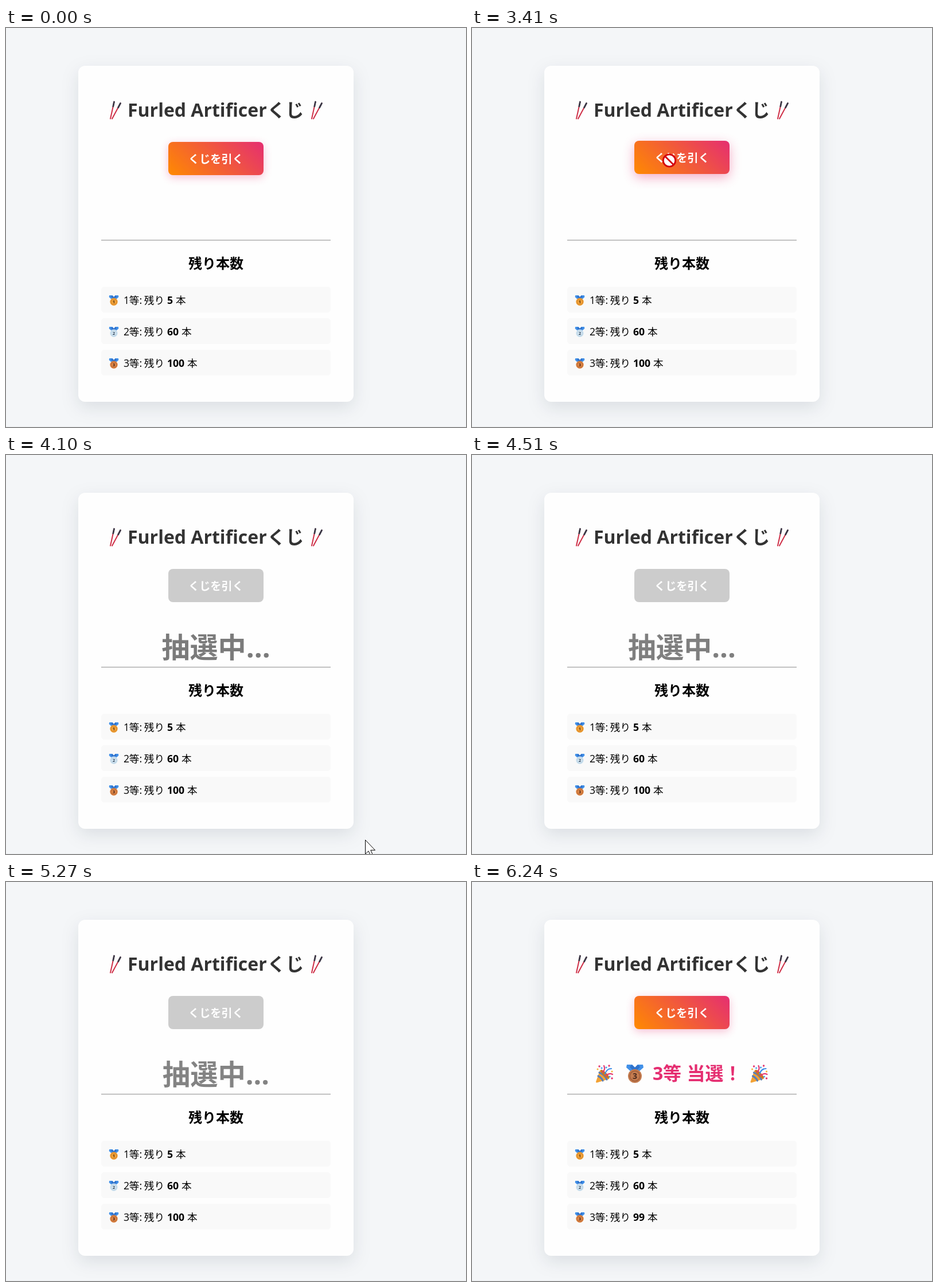
An HTML page that plays this animation: 802 px wide and 697 px high, repeating every 7760 ms.

```html
<!DOCTYPE html>
<html lang="ja">
<head>
<meta charset="utf-8">
<title>くじ</title>
<style>
html, body { margin: 0; width: 100%; height: 100%; overflow: hidden; background: #f4f6f8; }
svg { display: block; width: 802px; height: 697px; }
text { font-family: "Open Sans", "Noto Sans CJK JP", "Noto Sans CJK", sans-serif; white-space: pre; }
.card { fill: #fefefe; filter: drop-shadow(0 10px 15px rgba(0, 20, 35, .1)); }
</style>
</head>
<body>
<svg id="stage" viewBox="0 0 802 697" xmlns="http://www.w3.org/2000/svg"></svg>
<script>
const LOOP = 7760, DRAW = 3446, DONE = 5946, FADE = 300, PULSE = 600;
const stage = document.getElementById('stage');

const text = (x, y, size, str, { weight = 700, fill = '#000', extra = '' } = {}) =>
  `<text x="${x}" y="${y}" font-size="${size}" font-weight="${weight}" fill="${fill}" ${extra}>${str}</text>`;

const medal = (x, y, scale, n, disc, ring, ink) => `
  <g transform="translate(${x} ${y}) scale(${scale})">
    <path d="M-14-20H-5L0-15 5-20H14L15-15 6-7H-6L-15-15Z" fill="#4190e8"/>
    <path d="M-5-20L0-15 5-20 9-16 1-7H-1L-9-16Z" fill="#2f72cc"/>
    <circle r="12" fill="${disc}"/>
    <circle r="8.8" fill="none" stroke="${ring}" stroke-width="1.8"/>
    ${text(0, 5, 14, n, { fill: ink, extra: 'text-anchor="middle"' })}
  </g>`;

const sticks = x => `
  <g transform="translate(${x} 0)" stroke-linecap="round" fill="none">
    <path d="M8.5 129L2 158.5M19.5 131.5L5 158.5" stroke="#cf3048" stroke-width="2"/>
    <path d="M8.5 129L6.8 137M19.5 131.5L15.6 139" stroke="#3a3846" stroke-width="2.8"/>
  </g>`;

const popper = x => `
  <g transform="translate(${x} 335)" fill="none" stroke-linecap="round" stroke-width="2.2">
    <path d="M-15 14L-8-6Q4-1 8 9L-13 15.5Q-15 16-15 14Z" fill="#f3a234"/>
    <path d="M-11 4Q-5 7-3 12M-9-2Q1 2 4 10" stroke="#5b7fb5" stroke-width="3.2"/>
    <ellipse cx="0" cy="1" rx="3.2" ry="10.5" transform="rotate(-45)" fill="#c97425"/>
    <path d="M-3-3Q2-8-1-14M3 3Q8-2 14 1" stroke="#e53a72"/>
    <path d="M1 0Q4-9 12-9" stroke="#3f8fe8"/>
    <path d="M-9-13h.1M8-14h.1M13 8h.1" stroke="#e53a72" stroke-width="3.4"/>
    <path d="M-5-10h.1M3-11h.1M9 5h.1" stroke="#4aa0ee" stroke-width="3"/>
    <path d="M13-4h.1M-12-8h.1" stroke="#f6b53c" stroke-width="3"/>
  </g>`;

const bold = (x, y, str) => text(x, y, 17.6, str);
const plain = (x, y, str, extra = '') => text(x, y, 17.6, str, { weight: 400, extra });

const prizes = [
  { left: 5, unitX: 296, colors: ['#f0a23a', '#d98524', '#5a3510'] },
  { left: 60, unitX: 306, colors: ['#d3e5f1', '#b4cfe2', '#34495e'] },
  { left: 100, unitX: 316, colors: ['#e28a48', '#b5622f', '#4a2418'] }
];
const row = ({ left, unitX, colors }, i) => {
  const y = 452 + 55 * i, base = y + 30, n = i + 1;
  return `<rect x="166" y="${y}" width="400" height="45" rx="5" fill="#f9f9f9"/>
    ${medal(188, y + 26.3, .56, n, ...colors)}
    ${plain(205, base, n)}${plain(214.8, base, '等:')}${plain(240.8, base, '残り')}
    <g id="count${n}">${bold(281, base, left)}${plain(unitX, base, '本')}</g>`;
};

const ink = { fill: '#333' }, pink = { fill: '#e52e71' };
stage.innerHTML = `
  <defs>
    <linearGradient id="warm" gradientUnits="userSpaceOnUse" x1="310" y1="284" x2="422" y2="172">
      <stop stop-color="#ff8a00"/><stop offset="1" stop-color="#e52e71"/>
    </linearGradient>
  </defs>
  <rect width="802" height="697" fill="#f4f6f8"/>
  <rect y="696" width="802" height="1" fill="#eceef0"/>
  <rect class="card" x="126" y="66" width="480" height="587" rx="12"/>
  ${sticks(180)}${sticks(531)}
  ${text(212, 155, 32, 'Furled Artificer', ink)}${text(455.5, 155, 32, 'くじ', ink)}
  <g id="button">
    <rect id="glow" x="283" y="199" width="166" height="58" rx="8" fill="#e52e71"/>
    <rect id="face" x="283" y="199" width="166" height="58" rx="8"/>
    ${text(318, 236, 19.2, 'くじを引く', { fill: '#fff' })}
  </g>
  <g id="wait">${text(366, 354, 48, '抽選中...', { fill: '#555', extra: 'text-anchor="middle"' })}</g>
  <g id="result">
    ${popper(231)}${popper(500.5)}
    ${medal(284, 339, 1, 3, '#c47c50', '#a5603a', '#4d2b1e')}
    ${text(315, 346, 32, '3', pink)}${text(333, 346, 32, '等', pink)}${text(374.5, 346, 32, '当選！', pink)}
  </g>
  <rect x="166" y="370" width="400" height="1" fill="#9a9a9a"/>
  <rect x="166" y="371" width="400" height="1" fill="#eee"/>
  ${text(318, 420, 24, '残り本数')}
  ${prizes.map(row).join('')}
  <g id="countAfter">${bold(281, 592, 99)}${plain(306, 592, '本')}</g>
  <g id="cursor" stroke-linejoin="round">
    <path id="arrow" d="M.5.5V25L6 19.8 9.8 28 13.4 26.4 9.8 18.3H17.5Z" fill="#fff" stroke="#000"/>
    <path id="hand" d="M-2.3 2Q-2.3-.7 0-.7 2.4-.7 2.4 2V10Q3 8 5 8.2 7 8.5 7 11 7.6 9 9.4 9.5 11 10 11 12.5 12 11 13.5 12 14.8 13 14.5 16V21Q14 27 10 30.3H1Q-2 28-5 23L-9.3 17.5Q-10 14.8-8 14-5 14-2.3 18ZM2.4 10V15M7 11V16M11 12.5V17"
      fill="#fff" stroke="#000" stroke-width="1.1"/>
    <g id="block" transform="translate(0 -.5)">
      <circle r="10.7" fill="#fff" stroke="#d4000c" stroke-width="2.8"/>
      <path d="M-7.3-7.3L7.3 7.3" stroke="#d4000c" stroke-width="2.8"/>
    </g>
  </g>`;

const el = Object.fromEntries([...stage.querySelectorAll('[id]')].map(e => [e.id, e]));
const show = (e, on) => e.setAttribute('display', on ? 'inline' : 'none');
const clamp = v => Math.min(1, Math.max(0, v));
const mix = (a, b, k) => a + (b - a) * k;

// CSS "ease": cubic-bezier(.25, .1, .25, 1)
function ease(x) {
  x = clamp(x);
  const curve = (a, b, u) => 3 * a * u * (1 - u) ** 2 + 3 * b * u * u * (1 - u) + u ** 3;
  let lo = 0, hi = 1;
  for (let i = 0; i < 20; i++) {
    const mid = (lo + hi) / 2;
    if (curve(.25, .25, mid) < x) lo = mid; else hi = mid;
  }
  return curve(.1, 1, lo);
}

function tick(t) {
  if (t < 130) return 0;
  return t < 3410 ? 130 + Math.floor((t - 127) / 67.5) * 67.5
                  : 3410 + Math.floor((t - 3401) / 68.9) * 68.9;
}

const path = [
  [130, 704, 682], [200, 520, 590], [270, 378, 545], [400, 378, 545],
  [670, 344, 232], [3780, 344, 232], [4099, 626, 672]
];
function pointer(t) {
  let i = 1;
  while (i < path.length - 1 && path[i][0] < t) i++;
  const [a, b] = [path[i - 1], path[i]], k = clamp((t - a[0]) / (b[0] - a[0]));
  return [mix(a[1], b[1], k), mix(a[2], b[2], k)];
}

function update(time) {
  const t = tick(time);
  const drawing = t >= DRAW && t < DONE, done = t >= DONE;

  const off = ease((t - DRAW) / FADE);
  const hover = ease((t - 640) / FADE) * (1 - off);
  const glow = done ? ease((t - DONE) / FADE) : 1 - off;
  el.button.setAttribute('transform', `translate(0 ${-2 * hover})`);
  el.glow.setAttribute('transform', `translate(0 ${mix(4, 6, hover) * glow})`);
  el.glow.style.filter = `blur(${mix(7.5, 10, hover) * glow}px)`;
  el.glow.setAttribute('opacity', mix(.3, .4, hover) * glow);
  el.face.setAttribute('fill', drawing ? '#ccc' : 'url(#warm)');
  el.face.setAttribute('opacity', drawing ? off : 1);

  const phase = Math.max(0, t - DRAW) % PULSE / (PULSE / 2);
  const beat = phase < 1 ? ease(phase) : 1 - ease(phase - 1);
  show(el.wait, drawing);
  el.wait.setAttribute('opacity', mix(.7, 1, beat));
  el.wait.setAttribute('transform', `translate(366 336) scale(${mix(1, 1.1, beat)}) translate(-366 -336)`);
  show(el.result, done);
  show(el.count3, !done);
  show(el.countAfter, done);

  const [x, y] = pointer(t);
  const inside = x > 283 && x < 449 && y > 199 && y < 257;
  const locked = t >= 3410;
  show(el.cursor, t >= 130 && t < 4130);
  el.cursor.setAttribute('transform', `translate(${x} ${y})`);
  show(el.arrow, !inside);
  show(el.hand, inside && !locked);
  show(el.block, inside && locked);
}

const start = performance.now();
function frame() {
  update((performance.now() - start) % LOOP);
  requestAnimationFrame(frame);
}
frame();
</script>
</body>
</html>
```
